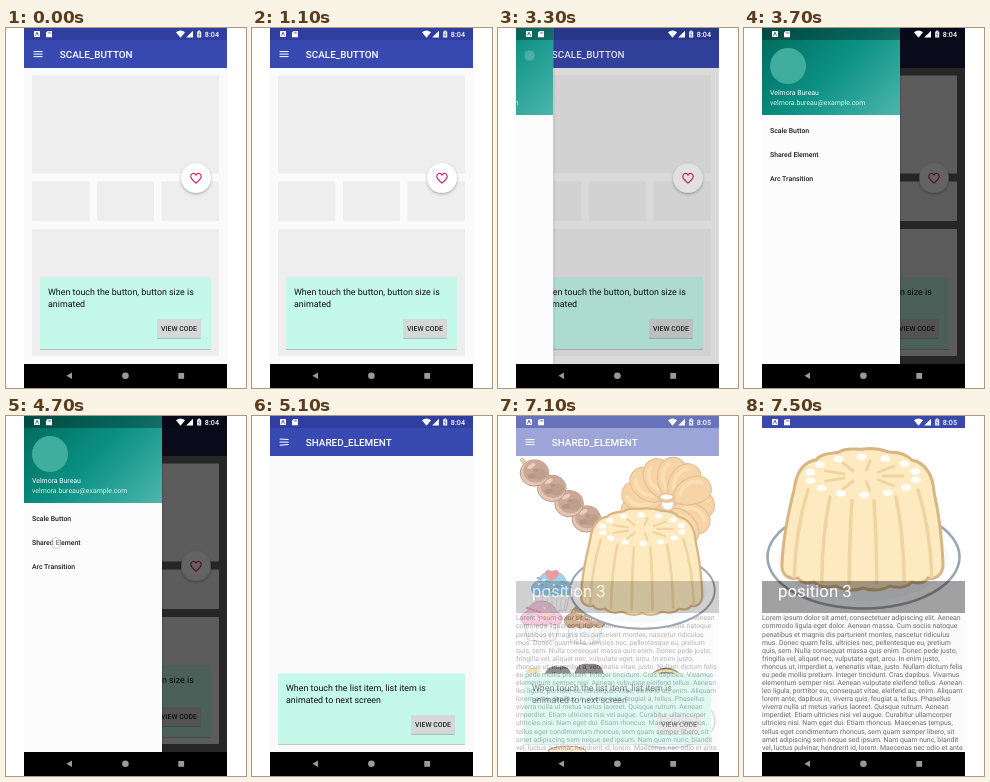
An HTML page that plays this animation: 240x360 px, repeating every 8000 ms.

```html
<!DOCTYPE html>
<html lang="en">
<head>
<meta charset="utf-8">
<title>Button and list demo</title>
<style>
  html, body { margin: 0; width: 100%; height: 100%; overflow: hidden; background: #fff; }
  svg { display: block; width: 100%; height: 100%; font-family: Roboto, sans-serif; text-rendering: geometricPrecision; }
  .m { font-weight: 500; }
</style>
</head>
<body>
<svg id="stage" viewBox="0 0 240 360"></svg>
<script>
const LOOP = 8000, STEP = 200;
const LEFT = 18, WIDE = 203, DRAWER = 138;

const range = (n, f) => Array.from({ length: n }, (_, i) => f(i)).join('');
const rect = (x, y, w, h, fill, more = '') =>
  `<rect x="${x}" y="${y}" width="${w}" height="${h}" fill="${fill}" ${more}/>`;
const oval = (x, y, rx, ry, fill, more = '') =>
  `<ellipse cx="${x}" cy="${y}" rx="${rx}" ry="${ry}" fill="${fill}" ${more}/>`;
const path = (d, fill, more = '') => `<path d="${d}" fill="${fill}" ${more}/>`;
const line = (d, color, w, more = '') =>
  path(d, 'none', `stroke="${color}" stroke-width="${w}" stroke-linecap="round" ${more}`);
const text = (x, y, size, str, more = '') =>
  `<text x="${x}" y="${y}" font-size="${size}" ${more}>${str}</text>`;
const group = (id, body, more = '') => `<g id="${id}" ${more}>${body}</g>`;

function infoCard(x, y, w, h, lines) {
  return rect(x, y, w, h, '#c4f8e9', 'rx="1" filter="url(#soft)"') +
    lines.map((s, i) => text(x + 8, y + 17.2 + i * 12.3, 8.9, s, 'fill="#111"')).join('') +
    rect(x + w - 54, y + 41.8, 44, 18.6, '#d6d7d7', 'rx="1" filter="url(#soft)"') +
    text(x + w - 32, y + 53.8, 6.92, 'VIEW CODE', 'class="m" fill="#222" text-anchor="middle"');
}

function scaleScreen() {
  const panel = (x, y, w, h) => rect(x, y, w, h, '#eee', 'rx="1"');
  return panel(26, 47.5, 187, 98) + panel(26, 153.5, 57.5, 39.5) + panel(91, 153.5, 57, 39.5) +
    panel(155.5, 153.5, 57.5, 39.5) + panel(26, 201, 187, 127) +
    infoCard(34, 249.5, 171, 71.5, ['When touch the button, button size is', 'animated']) +
    group('fab', oval(0, 0, 14.8, 14.8, '#fff', 'filter="url(#lift)"') +
      line('M0,8 C-6,3 -9,0 -9,-3.5 C-9,-9.5 -2.6,-10.4 0,-6 C2.6,-10.4 9,-9.5 9,-3.5 C9,0 6,3 0,8Z',
        '#d81b60', 2, 'transform="translate(0 .5) scale(.58)"'));
}

function dango() {
  const ball = i => `<g transform="translate(${36.5 + i * 17.3} ${57 + i * 15.3})">` +
    oval(0, 0, 14.3, 13.2, '#c98f60', 'stroke="#70391b" stroke-width="1"') +
    oval(1.4, -1.6, 12.6, 11.2, '#96502a') + oval(5, 1, 7, 6, '#7d3e1d') +
    oval(-3, 3, 4, 2.6, '#643014') + oval(1, -3, 2.4, 1.6, '#643014') +
    oval(-3, -7, 4.4, 2, '#d3a074', 'transform="rotate(-30 -3 -7)"') + '</g>';
  return line('M24,44 L113,133', '#a86f33', 4) + line('M24,44 L113,133', '#dfa65c', 2.4) +
    range(4, i => ball(3 - i));
}

function cruller() {
  const petal = path('M6,0 C12,-15 36,-18 45,-6 C50,4 45,14 34,14 C22,14 13,10 6,0Z', '#eda94a',
      'stroke="#cb7b26" stroke-width="1.1"') +
    line('M16,-3 C24,-10 34,-10 40,-3', '#f5bd69', 4);
  return `<g transform="translate(169.5 88)">` +
    range(13, i => `<g transform="rotate(${i * 360 / 13})">${petal}</g>`) +
    oval(-1, -6, 9, 5, '#d48a34') + oval(-1, -7, 6, 2.4, '#fff') + '</g>';
}

function cupcake(x, y, color, edge, topping) {
  return `<g transform="translate(${x} ${y})">` +
    path('M-18,6 L18,6 L14,25 Q0,28 -14,25Z', '#fff', 'stroke="#a9a9ae" stroke-width=".9"') +
    range(7, i => line(`M${(i - 3) * 5},8 L${(i - 3) * 4},25`, '#c4c4c8', .8)) +
    path('M-19,8 C-23,2 -18,-3 -14,-4 C-12,-11 -5,-14 0,-14 C6,-14 13,-10 14,-4 C20,-2 22,4 19,8 ' +
      'Q13,12 9,8 Q4,13 0,9 Q-5,13 -9,8 Q-14,12 -19,8Z', color, `stroke="${edge}" stroke-width=".9"`) +
    topping + '</g>';
}

const sprinkles = colors => range(17, i =>
  oval(-14 + i * 37 % 29, -7 + i * 23 % 13, 1.4, 1, colors[i % colors.length]));

function cupcakes() {
  const heart = path('M0,-4 C-9,-9 -8,-16 -3,-15 Q0,-14 0,-12 Q1,-15 4,-15 C9,-14 7,-8 0,-4Z', '#df3434');
  const cherry = oval(1, -12, 5, 4.6, '#d9222a') + oval(-.5, -13.5, 1.4, 1, '#fff');
  return cupcake(54, 169, '#3fa6df', '#2f7eac', sprinkles(['#7a4526', '#2a6fb0', '#fff']) + heart) +
    cupcake(96, 170, '#f8d060', '#c39a35', sprinkles(['#e98a3c', '#fff3b8']) + cherry) +
    cupcake(43.5, 199, '#f29bc4', '#c46b97', sprinkles(['#e23f6c', '#fff', '#f5d24a', '#5eb3d8'])) +
    cupcake(87, 201.5, '#a9672f', '#744019', sprinkles(['#f4cf50', '#ef8db5', '#fff', '#e9603a']));
}

// Drawn at header size around its own centre.
function pudding() {
  const fold = '#f0d5a2';
  const spot = i => {
    const a = .2 + Math.PI * 2 * i / 14;
    return oval(119 + 54 * Math.cos(a), 60 + 19 * Math.sin(a), 5, 3.4, '#fffdf8');
  };
  return '<g transform="translate(-119.5 -105)">' +
    oval(119.5, 141, 96, 51.5, '#fff', 'stroke="#9aa6b2" stroke-width="2.6"') +
    oval(119.5, 142, 85, 43, '#f7f8fa') +
    path('M50,74 C52,58 58,46 72,44 C78,36 90,38 95,36 C103,31 112,34 119,33 C127,32 136,33 145,36 ' +
      'C152,36 162,38 168,44 C182,47 189,60 190,76 C195,98 198,122 199,148 C199,160 190,164 184,162 ' +
      'Q180,169 168,166 Q160,174 146,170 Q133,177 119,172 Q105,177 92,170 Q78,174 70,166 Q58,169 54,162 ' +
      'C44,164 37,158 38,148 C39,122 44,98 50,74Z', '#fdeac1', 'stroke="#d8b582" stroke-width="3"') +
    range(6, i => {
      const k = i - 2.5, drop = k * k;
      return line(`M${119 + k * 22},${85 - drop * 1.8} Q${119 + k * 27},${120 - drop} ${119 + k * 27.5},${167 - drop}`,
        fold, 3.6);
    }) +
    range(9, i => {
      const a = Math.PI * 2 * i / 9;
      return line(`M${119 + 20 * Math.cos(a)},${60 + 6 * Math.sin(a)} l${20 * Math.cos(a)},${9 * Math.sin(a)}`, fold, 3);
    }) +
    range(14, spot) + '</g>';
}

function lowerRow() {
  return path('M46,264 C46,250 56,249 60,251 C68,248 74,253 74,264Z', '#241d1b') +
    path('M76,264 C76,247 86,247 91,248 C102,246 107,254 106,264Z', '#241d1b') +
    oval(35, 255, 7, 3, '#efc66e') +
    oval(169.5, 305, 47.5, 27, '#fff', 'stroke="#b4bcc4" stroke-width="1.3"') +
    path('M151,266 C152,247 184,247 185,266Z', '#2b2320') +
    line('M156,258 Q168,251 180,258', '#f1b84a', 2.4) +
    oval(69, 336, 19, 6, '#f2d9ae', 'stroke="#a9713a" stroke-width="1.2"');
}

function drawer() {
  const items = ['Scale Button', 'Shared Element', 'Arc Transition'];
  return rect(LEFT, 0, DRAWER, 336, '#fcfcfc', 'filter="url(#lift)"') +
    rect(LEFT, 0, DRAWER, 87, 'url(#teal)') + rect(LEFT, 0, DRAWER, 12, '#000', 'opacity=".3"') +
    oval(44, 38, 18, 18, '#3fae9f') +
    text(26, 67.4, 6.92, 'Velmora Bureau', 'fill="#fff"') +
    text(26, 77, 6.92, 'velmora.bureau@example.com', 'fill="#fff" opacity=".85"') +
    items.map((s, i) => text(26, 105.4 + i * 23.6, 6.92, s, 'class="m" fill="#1c1c1c"')).join('');
}

const LOREM = `Lorem ipsum dolor sit amet, consectetuer adipiscing elit. Aenean
commodo ligula eget dolor. Aenean massa. Cum sociis natoque
penatibus et magnis dis parturient montes, nascetur ridiculus
mus. Donec quam felis, ultricies nec, pellentesque eu, pretium
quis, sem. Nulla consequat massa quis enim. Donec pede justo,
fringilla vel, aliquet nec, vulputate eget, arcu. In enim justo,
rhoncus ut, imperdiet a, venenatis vitae, justo. Nullam dictum felis
eu pede mollis pretium. Integer tincidunt. Cras dapibus. Vivamus
elementum semper nisi. Aenean vulputate eleifend tellus. Aenean
leo ligula, porttitor eu, consequat vitae, eleifend ac, enim. Aliquam
lorem ante, dapibus in, viverra quis, feugiat a, tellus. Phasellus
viverra nulla ut metus varius laoreet. Quisque rutrum. Aenean
imperdiet. Etiam ultricies nisi vel augue. Curabitur ullamcorper
ultricies nisi. Nam eget dui. Etiam rhoncus. Maecenas tempus,
tellus eget condimentum rhoncus, sem quam semper libero, sit
amet adipiscing sem neque sed ipsum. Nam quam nunc, blandit
vel, luctus pulvinar, hendrerit id, lorem. Maecenas nec odio et ante`.split('\n');

function systemBars() {
  return rect(28, 3, 6, 6, '#fff', 'rx=".8"') +
    path('M29.5,7.8 L31,4.2 L32.5,7.8', 'none', 'stroke="#303f9f" stroke-width=".8"') +
    path('M41.6,3 H46 V9.2 H40 V4.6Z', '#fff') + line('M42.2,4 V5.4 M43.5,4 V5.4 M44.8,4 V5.4', '#303f9f', .5) +
    path('M170,4.2 Q174.5,1 179,4.2 L174.5,9.8Z', '#fff') + path('M187,2.8 V9.6 H180.2Z', '#fff') +
    path('M191.2,3.4 H192.4 V2.6 H194 V3.4 H195.2 V9.6 H191.2Z', '#fff') +
    line('M193.4,4.4 L192.5,6.6 H194 L193,8.6', '#303f9f', .6) +
    text(213, 8.9, 7.2, '8:04', 'id="clock" class="m" fill="#fff" text-anchor="end"') +
    rect(LEFT, 336, WIDE, 24, '#000') + path('M60.4,347.8 L66,344.6 V351Z', '#9a9a9a') +
    oval(119.4, 347.8, 3.3, 3.3, '#9a9a9a') + rect(172.3, 345, 5.8, 5.8, '#9a9a9a');
}

const stage = document.getElementById('stage');
stage.innerHTML = `<defs>
  <clipPath id="screen">${rect(LEFT, 0, WIDE, 360, '#000')}</clipPath>
  <filter id="soft" x="-20%" y="-20%" width="140%" height="150%"><feDropShadow dx="0" dy=".7" stdDeviation=".7" flood-opacity=".3"/></filter>
  <filter id="lift" x="-30%" y="-30%" width="160%" height="170%"><feDropShadow dx="0" dy="1.2" stdDeviation="1.7" flood-opacity=".32"/></filter>
  <linearGradient id="teal" gradientUnits="userSpaceOnUse" x1="31" y1="-12" x2="143" y2="100">
    <stop offset="0" stop-color="#00695c"/><stop offset=".5" stop-color="#0b9184"/><stop offset="1" stop-color="#4db6ac"/>
  </linearGradient></defs>
  <g clip-path="url(#screen)">` +
  rect(LEFT, 0, WIDE, 336, '#fafafa') +
  rect(LEFT, 12, WIDE, 28, '#3949b2') + rect(LEFT, 0, WIDE, 12, '#303f9f') +
  range(3, i => line(`M28,${23.6 + i * 2.5} h8.2`, '#fff', 1, `id="bar${i}"`)) +
  text(53.8, 29.6, 9.9, '', 'id="title" class="m" fill="#fff"') +
  group('shade', rect(LEFT, 0, WIDE, 336, '#000')) +
  group('scale', scaleScreen()) +
  group('list', group('pics', rect(LEFT, 40, WIDE, 296, '#fff') + dango() + cruller() + cupcakes() + lowerRow() +
      group('cell', pudding(), 'transform="translate(169.5 188.7) scale(.505)"')) +
    infoCard(26, 257.5, 187, 70.5, ['When touch the list item, list item is', 'animated to next screen'])) +
  group('scrim', rect(LEFT, 0, WIDE, 336, '#000')) +
  group('drawer', drawer()) +
  group('back', rect(LEFT, 0, WIDE, 336, '#fafafa') + rect(LEFT, 12, WIDE, 185, '#fff') +
    LOREM.map((s, i) => text(LEFT, 204.4 + i * 8.08, 6.92, s, 'fill="#6a6a6a"')).join('')) +
  group('hero', pudding()) +
  group('front', rect(LEFT, 0, WIDE, 12, '#3949ab') + rect(LEFT, 165, WIDE, 32, '#000', 'opacity=".37"') +
    text(34, 181.4, 16.8, 'position 3', 'fill="#fff"')) +
  systemBars() +
  group('touch', oval(0, 0, 5.3, 5.3, '#fff', 'fill-opacity=".45" stroke="#8f8fa8" stroke-opacity=".55" stroke-width=".8"')) +
  '</g>';

const el = id => document.getElementById(id);
const set = (id, name, value) => el(id).setAttribute(name, value);
const show = (id, on) => set(id, 'display', on ? 'inline' : 'none');
const span = (t, a, b) => Math.min(1, Math.max(0, (t - a) / (b - a)));
const easeOut = u => 1 - (1 - u) ** 3;
const easeBoth = u => u * u * (3 - 2 * u);

// x, y, start, end, opacity
const TOUCHES = [
  [190, 150, 500, 900, 1], [190, 150, 1900, 2300, 1], [31.5, 27.5, 3300, 3500, .45],
  [50, 127, 4300, 4900, 1], [172, 187, 6500, 6900, 1]
];

function bounce(t, start) {
  const u = span(t, start - STEP, start + 600);
  return .3 * Math.sin(2 * Math.PI * u) * (1 - u);
}

function draw(now) {
  // The picture is held for one step at a time.
  const t = Math.floor((now - 100) / STEP) * STEP + 100;
  const second = t >= 4900;

  const size = 1 - bounce(t, 500) - bounce(t, 1900);
  set('fab', 'transform', `translate(190 150) scale(${size})`);
  show('scale', !second);
  show('list', second);
  show('pics', t >= 5500);
  el('title').textContent = second ? 'SHARED_ELEMENT' : 'SCALE_BUTTON';
  el('clock').textContent = t >= 5700 ? '8:05' : '8:04';

  // The page behind the panels darkens more than the panels do.
  const open = easeOut(span(t, 3256, 3700)) - easeOut(span(t, 4780, 5100));
  set('drawer', 'transform', `translate(${DRAWER * (open - 1)} 0)`);
  show('drawer', open > .001);
  set('scrim', 'opacity', .61 * open ** 1.25);
  set('shade', 'opacity', .61 * open ** 3);
  const tilt = second ? 8 * (1 - span(t, 4900, 5300)) : 0;
  set('bar0', 'transform', `rotate(${tilt} 36.2 23.6)`);
  set('bar2', 'transform', `rotate(${-tilt} 36.2 28.6)`);

  const grow = easeBoth(span(t, 6700, 7500));
  const mix = (a, b) => a + (b - a) * grow;
  set('hero', 'transform', `translate(${mix(169.5, 119.5)} ${mix(188.7, 105)}) scale(${mix(.505, 1)})`);
  set('back', 'opacity', grow);
  set('front', 'opacity', grow);
  show('hero', grow > 0);
  show('cell', grow === 0);

  const touch = TOUCHES.find(([, , a, b]) => t >= a && t < b);
  show('touch', touch);
  if (touch) {
    set('touch', 'transform', `translate(${touch[0]} ${touch[1]})`);
    set('touch', 'opacity', touch[4]);
  }
}

const begin = performance.now();
function tick() {
  draw((performance.now() - begin) % LOOP);
  requestAnimationFrame(tick);
}
tick();
</script>
</body>
</html>
```
